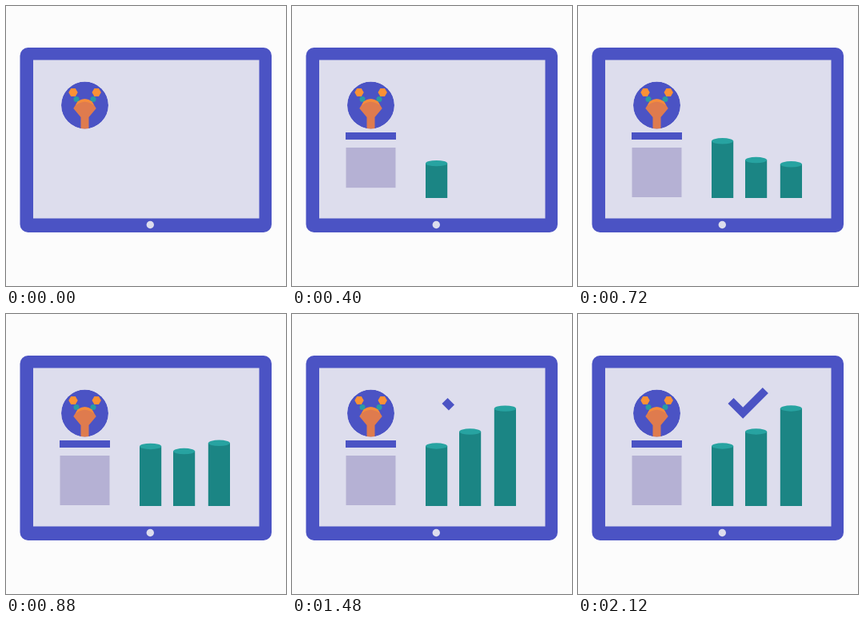
Write an HTML page that moves like this. It is 350 px wide and 350 px high and loops after 6040 ms.

```html
<!DOCTYPE html>
<html lang="en">
<head>
<meta charset="utf-8">
<title>Tablet dashboard</title>
<style>
  html, body { margin: 0; width: 100%; height: 100%; overflow: hidden; background: #fcfcfc; }
  svg { display: block; width: 100%; height: 100%; }
</style>
</head>
<body>
<svg viewBox="0 0 350 350">
  <defs>
    <clipPath id="disc"><circle cx="98.5" cy="124" r="29.5"/></clipPath>
    <clipPath id="floor"><rect x="150" y="68" width="160" height="172"/></clipPath>
  </defs>

  <rect x="17.5" y="52" width="314.5" height="231" rx="10" fill="#4b53c4"/>
  <rect x="34" y="67.5" width="282.5" height="198" fill="#dddded"/>
  <circle cx="180.3" cy="273.5" r="4.7" fill="#dddded"/>

  <g clip-path="url(#disc)">
    <circle cx="98.5" cy="124" r="29.5" fill="#4b53c4"/>
    <g fill="#2a9ba3">
      <circle cx="88" cy="116.5" r="3.5"/>
      <circle cx="109" cy="116.5" r="3.5"/>
    </g>
    <g fill="#fb9135">
      <path d="M78.3 108l2.9-5h5.6l2.9 5-2.9 5h-5.6z"/>
      <path d="M107.5 108l2.9-5h5.6l2.9 5-2.9 5h-5.6z"/>
    </g>
    <path d="M84.3 128l5.2-8.5q9-6.5 18 0l5.2 8.5-9.2 11v16h-10v-16z" fill="#df7b4e"/>
    <path d="M87 124l2.5-4.5q9-6.5 18 0l2.5 4.5-4.5-2.5q-7-3.5-14 0z" fill="#f58c3c"/>
  </g>

  <rect id="title" y="158" height="9" fill="#4b53c4"/>
  <rect id="panel" x="67.5" y="177" width="62" fill="#b5b1d4"/>
  <g id="bars" clip-path="url(#floor)"></g>
  <path id="check" d="M191 108.4L206.2 123.7 234.6 95.3" pathLength="1" fill="none" stroke="#4b53c4" stroke-width="10"/>
</svg>

<script>
const LOOP = 6040, STEP = 40, END = 2120, FLOOR = 240;
const $ = id => document.getElementById(id);
const set = (el, attrs) => {
  for (const k in attrs) el.setAttribute(k, attrs[k]);
  return el;
};
const add = (tag, attrs) =>
  $('bars').appendChild(set(document.createElementNS('http://www.w3.org/2000/svg', tag), attrs));

const progress = (t, start, span) => Math.max(0, Math.min(1, (t - start) / span));
const easeOut = (u, power = 3) => 1 - (1 - u) ** power;
const backOut = (u, k = 1.25) => 1 + (k + 1) * (u - 1) ** 3 + k * (u - 1) ** 2;

const bars = [
  { x: 167, height: 75, start: 190, span: 840 },
  { x: 209, height: 93, start: 489, span: 1090 },
  { x: 252.8, height: 122, start: 588, span: 1000 }
].map(bar => ({
  ...bar,
  body: add('rect', { x: bar.x, width: 27.2, fill: '#1b8584' }),
  cap: add('ellipse', { cx: bar.x + 13.6, rx: 13.6, ry: 3.7, fill: '#27a3a1' })
}));

function draw(t) {
  const width = 63 * Math.max(0, backOut(progress(t, 80, 320)));
  set($('title'), { x: 98.5 - width / 2, width });
  set($('panel'), { height: 62 * easeOut(progress(t, 137, 620)) });

  for (const { height, start, span, body, cap } of bars) {
    const u = progress(t, start, span);
    const h = height * easeOut(u);
    const visibility = u > 0 ? 'visible' : 'hidden';
    set(body, { y: FLOOR - h, height: h, visibility });
    set(cap, { cy: FLOOR - h, visibility });
  }

  const drawn = easeOut(progress(t, 1400, 780), 2);
  set($('check'), { 'stroke-dasharray': `${drawn} 2`, visibility: drawn > 0 ? 'visible' : 'hidden' });
}

const origin = performance.now();
function tick() {
  const t = (performance.now() - origin) % LOOP;
  draw(Math.min(END, Math.floor(t / STEP) * STEP));
  requestAnimationFrame(tick);
}
tick();
</script>
</body>
</html>
```
